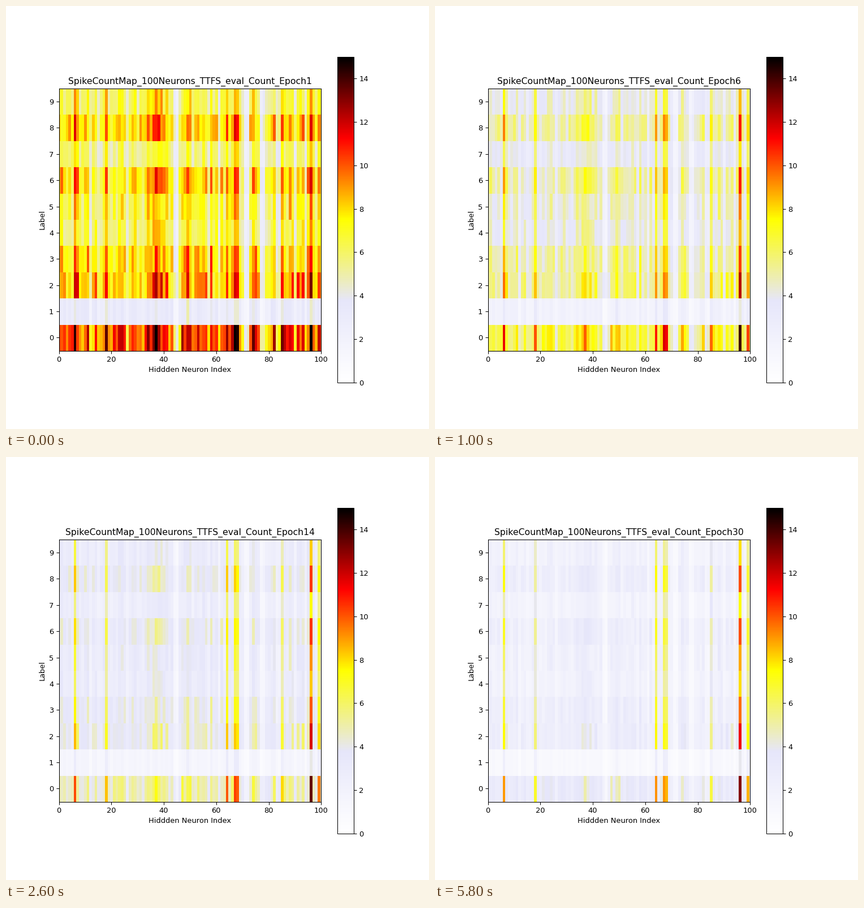
These frames come from a looping animation (748x748 px, 6 s). A matplotlib script:

```python
import matplotlib.pyplot as plt
import numpy as np
from matplotlib.animation import FuncAnimation
from matplotlib.colors import LinearSegmentedColormap

EPOCHS = 30
LABELS = 10
NEURONS = 101

label_gain = np.array([1.25, 0.38, 1.04, 0.95, 0.77, 0.82, 0.94, 0.71, 0.98, 0.78])

# Neurons that stay active: first-epoch spikes, fall per log-epoch
lasting = {6: (11.5, 0.11), 18: (11, 0.145), 64: (10.3, 0.085), 67: (11.6, 0.115),
           68: (11.2, 0.12), 85: (10.5, 0.15), 96: (12, 0.04), 99: (9.5, 0.085)}

rng = np.random.default_rng(7)
index = np.arange(NEURONS)


def bump(center, width):
    return np.exp(-((index - center) / width) ** 2)


# Ordinary neurons, some of them quiet, with busy and quiet bands
strength = rng.normal(8.4, 1.0, NEURONS).clip(6, 10.5)
strength[rng.random(NEURONS) < 0.15] *= 0.65
strength += 2 * bump(38, 3) + bump(48, 2)
strength *= 1 - 0.5 * (bump(45, 1.5) + bump(71, 1.5) + bump(78, 1.5))
fall = rng.normal(0.2, 0.008, (LABELS, NEURONS))
spread = np.full(NEURONS, 0.1)

for neuron, (spikes, rate) in lasting.items():
    strength[neuron] = spikes
    fall[:, neuron] = rate
    spread[neuron] = 0.03

start = np.outer(label_gain, strength)
start *= 1 + spread * rng.normal(size=start.shape).clip(-2, 2)


def counts(epoch):
    return np.clip(start * (1 - fall * np.log(epoch)), 0, 15)


plt.rcParams["font.family"] = "DejaVu Sans"
cmap = LinearSegmentedColormap.from_list(
    "spikes", ["white", "lavender", "yellow", "red", "black"])

fig, ax = plt.subplots(figsize=(8, 8), dpi=93.5)
image = ax.imshow(counts(1), cmap=cmap, vmin=0, vmax=15, origin="lower",
                  extent=(-0.5, NEURONS - 0.5, -0.5, LABELS - 0.5),
                  aspect=10, interpolation="nearest")
ax.set_xlim(0, 100)
ax.set_yticks(range(LABELS))
ax.set_xlabel("Hiddden Neuron Index")
ax.set_ylabel("Label")
title = ax.set_title("")
fig.colorbar(image, ax=ax)


def update(i):
    image.set_data(counts(i + 1))
    title.set_text(f"SpikeCountMap_100Neurons_TTFS_eval_Count_Epoch{i + 1}")
    return image, title


anim = FuncAnimation(fig, update, frames=EPOCHS, interval=200, repeat=True,
                     repeat_delay=0, blit=False)
plt.show()
```
